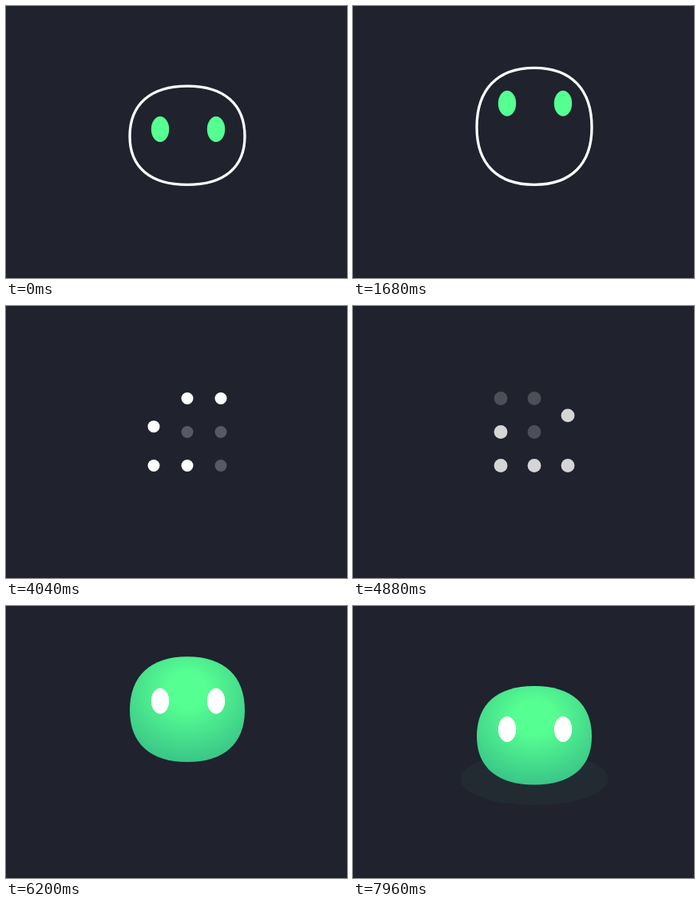
Write an HTML page with a canvas that moves like this. It is 427 px wide and 340 px high and loops after 8000 ms.

```html
<!DOCTYPE html>
<html lang="en">
<head>
<meta charset="utf-8">
<title>Bouncing blob</title>
<style>
  html, body { margin: 0; width: 100%; height: 100%; overflow: hidden; background: #20222d; }
  canvas { display: block; width: 427px; height: 340px; }
</style>
</head>
<body>
<canvas id="stage"></canvas>
<script>
const LOOP = 8000;
const WIDTH = 427, HEIGHT = 340;
const GREEN = '#56ff92', WHITE = '#fff', DIM = '#585a63', BACKGROUND = '#20222d';
const CENTER = 227, FLOOR = 223.4, BODY_HEIGHT = 123.3, EYE_Y = 154;

const canvas = document.getElementById('stage');
const ctx = canvas.getContext('2d');
const ratio = window.devicePixelRatio || 1;
canvas.width = WIDTH * ratio;
canvas.height = HEIGHT * ratio;

const clamp = x => Math.min(1, Math.max(0, x));
const ramp = (t, from, to) => clamp((t - from) / (to - from));
const smooth = x => x * x * (3 - 2 * x);
const mod = (n, m) => ((n % m) + m) % m;
// Rises from 0 to 1 at the centre time and falls back to 0.
const bump = (t, center, width) => Math.cos(clamp(Math.abs(t - center) / width) * Math.PI / 2) ** 2;

function ellipse(x, y, rx, ry, color) {
  ctx.fillStyle = color;
  ctx.beginPath();
  ctx.ellipse(x, y, rx, ry, 0, 0, 2 * Math.PI);
  ctx.fill();
}

function blobPath(top, bottom) {
  const rx = 72, kx = rx * 0.64;
  const cy = top + (bottom - top) * 0.51;
  const up = (cy - top) * 0.64, down = (bottom - cy) * 0.64;
  const left = CENTER - rx, right = CENTER + rx;
  ctx.beginPath();
  ctx.moveTo(left, cy);
  ctx.bezierCurveTo(left, cy - up, CENTER - kx, top, CENTER, top);
  ctx.bezierCurveTo(CENTER + kx, top, right, cy - up, right, cy);
  ctx.bezierCurveTo(right, cy + down, CENTER + kx, bottom, CENTER, bottom);
  ctx.bezierCurveTo(CENTER - kx, bottom, left, cy + down, left, cy);
  ctx.closePath();
}

function drawEyes(y, squash, color) {
  for (const x of [193, 263]) ellipse(x, y, 11.2 + 2 * squash, 16 - 3 * squash, color);
}

// Outlined blob: crouch, stretch, leap.
function drawOutline(t) {
  const crouch = bump(t, 840, 600);
  const stretch = smooth(ramp(t, 1000, 1680)) - smooth(ramp(t, 1900, 2400));
  const lift = 58 * Math.sin(Math.PI * ramp(t, 1700, 2460));
  const bottom = FLOOR - lift;
  ctx.globalAlpha = 1 - ramp(t, 2320, 2480);
  blobPath(bottom - BODY_HEIGHT + 12 * crouch - 22.8 * stretch, bottom);
  ctx.strokeStyle = WHITE;
  ctx.lineWidth = 3.3;
  ctx.stroke();
  drawEyes(EYE_Y + 10 * crouch - 32.3 * stretch - lift, 0, GREEN);
}

// Clockwise ring of slots; the gap travels the other way as dots slide into it.
const RING = [[0, 0], [1, 0], [2, 0], [2, 1], [2, 2], [1, 2], [0, 2], [0, 1]];
const STEP = 160;

function drawDots(t) {
  const end = ramp(t, 4840, 5060);
  const radius = 7.5 * ramp(t, 2440, 2560) + 5 * end;
  const moves = Math.floor(t / STEP) - 25;
  const dot = (col, row, color) => ellipse(185 + 42 * col, 115.5 + 42 * row, radius, radius, color);
  ctx.globalAlpha = 1 - end;
  dot(1, 1, DIM);
  for (let i = 1; i < 8; i++) {
    const [x, y] = RING[mod(i - moves, 8)];
    const [nextX, nextY] = RING[mod(i - moves + 1, 8)];
    const p = i === 7 ? smooth(t % STEP / STEP) : 0;
    const id = mod(i - 1 + moves, 7);
    dot(x + (nextX - x) * p, y + (nextY - y) * p, id === 2 || id === 3 ? DIM : WHITE);
  }
}

const HOPS = [
  { start: 5300, end: 5700, height: 20 },
  { start: 5900, end: 6500, height: 28.3 },
  { start: 6500, end: 7100, height: 20 }
];
const CONTACTS = [...new Set(HOPS.flatMap(hop => [hop.start, hop.end]))];
const RIPPLES = [5300, 6500, 7100];

function drawRipple(t, lift, opacity) {
  const start = RIPPLES.filter(time => time <= t).pop();
  const p = (t - start) / 900;
  if (!(p < 1)) return;
  const scale = 0.35 + 0.65 * (1 - (1 - p) ** 3);
  ctx.globalAlpha = opacity * (0.045 + 0.8 * Math.exp(-25 * p)) * clamp((1 - p) * 20);
  ellipse(CENTER, 211 + 5 * scale - lift, 92.5 * scale, 33 * scale, GREEN);
}

function fillBody(top, bottom) {
  const height = bottom - top;
  const shade = ctx.createRadialGradient(0, 0, 0, 0, 0, 0.76);
  shade.addColorStop(0.22, GREEN);
  shade.addColorStop(1, '#36bd86');
  blobPath(top, bottom);
  ctx.save();
  ctx.translate(CENTER, top + height * 0.32);
  ctx.scale(144, height);
  ctx.fillStyle = shade;
  ctx.fill();
  ctx.restore();
}

// Filled blob: squashes at each contact, stretches in the air, eyes lead the way.
function drawBody(t) {
  const hop = HOPS.find(h => t >= h.start && t < h.end);
  const p = hop ? ramp(t, hop.start, hop.end) : 0;
  const lift = hop ? hop.height * Math.sin(Math.PI * p) : 0;
  const lead = 13 * Math.sin(2 * Math.PI * p);
  const squash = Math.max(...CONTACTS.map(time => bump(t, time, 160)));
  const opacity = ramp(t, 5080, 5570);
  const bottom = FLOOR - lift;

  drawRipple(t, lift, opacity);
  ctx.globalAlpha = opacity;
  fillBody(bottom - BODY_HEIGHT - 0.3 * lift + 11.7 * squash, bottom);
  drawEyes(EYE_Y - 1.25 * lift - lead + 8.5 * squash, squash, WHITE);
}

function draw(t) {
  ctx.setTransform(ratio, 0, 0, ratio, 0, 0);
  ctx.globalAlpha = 1;
  ctx.fillStyle = BACKGROUND;
  ctx.fillRect(0, 0, WIDTH, HEIGHT);

  if (t < 2480) drawOutline(t);
  if (t >= 2440 && t < 5060) drawDots(t);
  if (t >= 5080) drawBody(t);
}

const origin = performance.now();
function tick() {
  draw((performance.now() - origin) % LOOP);
  requestAnimationFrame(tick);
}
tick();
</script>
</body>
</html>
```
